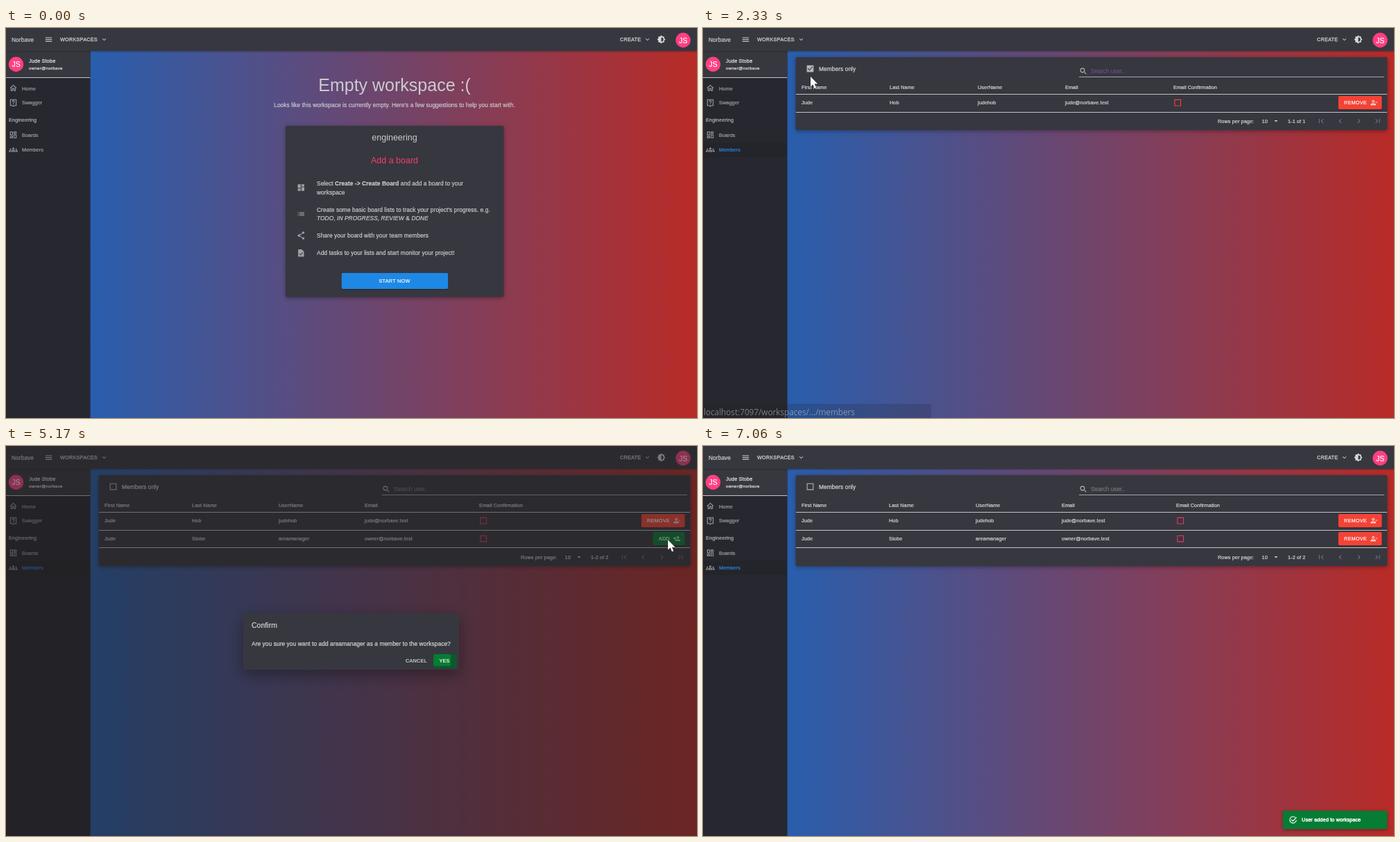
Recreate the animation shown at these times as an HTML page with a canvas. Size 996 by 562 pixels, loop 8.22 s.

```html
<!DOCTYPE html>
<html lang="en">
<head>
<meta charset="utf-8">
<title>Workspace members</title>
<style>
html, body { margin: 0; width: 100%; height: 100%; overflow: hidden; background: #27272f; }
canvas { display: block; }
</style>
</head>
<body>
<canvas id="stage" width="996" height="562"></canvas>
<script>
const W = 996, H = 562, LOOP = 8220;
const ctx = document.getElementById('stage').getContext('2d');
const SANS = '"Liberation Sans", Arial, sans-serif';
const BODY = 8.34, SMALL = 7.3;
const C = {
  surface: '#37373f', drawer: '#27272f', text: '#cbcbcf', table: '#d8d8dc', dim: '#a0a0a6',
  line: '#c3c3c8', pink: '#ff4081', red: '#f44336', green: '#067c34', blue: '#2196f3'
};

// Moments of the story, in ms
const T = {
  page: 1310, row: 1820, uncheck: 3040, dialog: 4870, close: 6150, added: 6500
};

// Icons on a 24 unit grid
const person = 'a4 4 0 100 8 4 4 0 000-8zm0 2a2 2 0 110 4 2 2 0 010-4z';
const ICON = {
  menu: 'M3 6h18v2H3zM3 11h18v2H3zM3 16h18v2H3z',
  more: 'M16.6 8.6L12 13.2 7.4 8.6 6 10l6 6 6-6z',
  theme: 'M20 15.3L23.3 12 20 8.7V4h-4.7L12 .7 8.7 4H4v4.7L.7 12 4 15.3V20h4.7l3.3 3.3 3.3-3.3H20zM12 18V6a6 6 0 010 12z',
  home: 'M12 3L2 12h3v8h6v-6h2v6h6v-8h3zM12 5.7l5 4.5V18h-2v-6H9v6H7v-7.8z',
  help: 'M3 2h18v18h-6l-3 3-3-3H3zM5 4v14h4.8l2.2 2.2 2.2-2.2H19V4zM11 15h2v2h-2zM12 5a4 4 0 00-4 4h2a2 2 0 114 0c0 2-3 1.8-3 5h2c0-2.3 3-2.5 3-5a4 4 0 00-4-4z',
  boards: 'M3 3h8v10H3zM5 5v6h4V5zM13 3h8v6h-8zM15 5v2h4V5zM3 15h8v6H3zM5 17v2h4v-2zM13 11h8v10h-8zM15 13v6h4v-6z',
  board: 'M3 3h8v10H3zM13 3h8v6h-8zM3 15h8v6H3zM13 11h8v10h-8z',
  groups: 'M12 6a3 3 0 100 6 3 3 0 000-6zm0 2a1 1 0 110 2 1 1 0 010-2zM4 9a2 2 0 100 4 2 2 0 000-4zM20 9a2 2 0 100 4 2 2 0 000-4zM6 18v-2c0-4 12-4 12 0v2zM8 16h8c-1-1.6-7-1.6-8 0zM0 18v-2c0-1.6 3-2.4 5-2q-.8 1-.6 4zM24 18v-2c0-1.6-3-2.4-5-2q.8 1 .6 4z',
  list: 'M3 7h2v2H3zM3 11h2v2H3zM3 15h2v2H3zM7 7h14v2H7zM7 11h14v2H7zM7 15h14v2H7z',
  task: 'M4 2h10l6 6v14H4zM10.9 18l6.4-6.4-1.4-1.4-5 5-2.4-2.5-1.5 1.5z',
  box: 'M3 3h18v18H3zM5 5v14h14V5z',
  checked: 'M3 3h18v18H3zM10 17l9-9-1.4-1.4-7.6 7.6-3.6-3.6L5 12z',
  search: 'M9.5 3a6.5 6.5 0 100 13 6.5 6.5 0 000-13zm0 2a4.5 4.5 0 110 9 4.5 4.5 0 010-9zM14 15.5l1.5-1.5 5 5-1.5 1.5z',
  drop: 'M7 10l5 5 5-5z',
  first: 'M18.4 16.6L13.8 12l4.6-4.6L17 6l-6 6 6 6zM6 6h2v12H6z',
  prev: 'M15.4 7.4L14 6l-6 6 6 6 1.4-1.4L10.8 12z',
  remove: 'M10 4' + person + 'M2 20v-2c0-5.3 16-5.3 16 0v2zM4 18h12c-1-2.6-11-2.6-12 0zM17 10h6v2h-6z',
  add: 'M15 4' + person + 'M7 20v-2c0-5.3 16-5.3 16 0v2zM9 18h12c-1-2.6-11-2.6-12 0zM1 10h3V7h2v3h3v2H6v3H4v-3H1z'
};
for (const k in ICON) ICON[k] = new Path2D(ICON[k]);
const ARROW = new Path2D('M0 0V14.5L3.4 11.4 5.8 17 8.2 16 5.8 10.5H10.3z');
const HAND = new Path2D('M-1.2 1.2Q0-1 1.3 1.2V6.2L5.6 7.2Q7.6 7.8 7.4 9.8L6.4 15V18H-2V15.8L-5 11.4Q-5.4 9.4-3.4 10L-1.2 11.8z');

function icon(name, x, y, color, size = 12.5, flip = 1) {
  ctx.save();
  ctx.translate(x, y);
  ctx.scale(flip * size / 24, size / 24);
  ctx.translate(-12, -12);
  ctx.fillStyle = color;
  ctx.fill(ICON[name], 'evenodd');
  ctx.restore();
}

// y is the middle of the capital letters; heavy thickens the strokes a little
function text(s, x, y, size, color, { align = 'left', style = '', gap = 0.01, heavy = 0.2, family = SANS } = {}) {
  ctx.font = `${style} ${size}px ${family}`;
  ctx.letterSpacing = size * gap + 'px';
  ctx.textAlign = align;
  ctx.fillStyle = ctx.strokeStyle = color;
  ctx.fillText(s, x, y + size * 0.36);
  if (heavy) {
    ctx.lineWidth = heavy;
    ctx.lineJoin = 'round';
    ctx.strokeText(s, x, y + size * 0.36);
  }
  return x + ctx.measureText(s).width;
}

function runs(x, y, ...parts) {
  for (const [s, style] of parts) x = text(s, x, y, BODY, C.text, { style });
}

function rect(x, y, w, h, color, r = 0) {
  ctx.fillStyle = color;
  ctx.beginPath();
  ctx.roundRect(x, y, w, h, r);
  ctx.fill();
}

function raised(x, y, w, h, color, r, blur, drop) {
  ctx.save();
  ctx.shadowColor = 'rgba(0,0,0,.35)';
  ctx.shadowBlur = blur;
  ctx.shadowOffsetY = drop;
  rect(x, y, w, h, color, r);
  ctx.restore();
}

function button(x, y, w, h, label, color, pic) {
  raised(x, y, w, h, color, 2, 2, 0.8);
  text(label, x + 8.3, y + h / 2, SMALL, '#fff', { gap: 0.0286 });
  icon(pic, x + w - 11.5, y + h / 2, '#fff', 10.8);
}

function avatar(x, y) {
  ctx.fillStyle = C.pink;
  ctx.beginPath();
  ctx.arc(x, y, 10.7, 0, 7);
  ctx.fill();
  text('JS', x, y + 0.3, 10.4, '#fff', { align: 'center', gap: 0 });
}

const ramp = (t, a, b) => Math.min(1, Math.max(0, (t - a) / (b - a)));

function faded(alpha, draw) {
  if (alpha <= 0) return;
  ctx.save();
  ctx.globalAlpha = alpha;
  draw();
  ctx.restore();
}

const sky = ctx.createLinearGradient(0, 0, W, 0);
sky.addColorStop(0, '#1565c0');
sky.addColorStop(1, '#b92b27');

function shell(t) {
  raised(0, 33, 121.4, 529, C.drawer, 0, 2, 0);
  rect(0, 33, 121.4, 38, C.surface);
  rect(0, 71, 121.4, 1, C.line);
  raised(0, 0, W, 33.3, C.surface, 0, 3, 1);

  text('Norbave', 8, 17, BODY, C.text);
  icon('menu', 61.5, 16.5, C.text);
  text('WORKSPACES', 78, 16.5, SMALL, C.text, { gap: 0.0286, heavy: 0.3 });
  icon('more', 141.5, 16.5, C.text, 11);
  text('CREATE', 885, 16.5, SMALL, C.text, { gap: 0.0286, heavy: 0.3 });
  icon('more', 924.5, 16.5, C.text, 11);
  icon('theme', 944.5, 16.5, '#d8d8dc');
  avatar(976, 17.5);

  avatar(14.5, 52.2);
  text('Jude Stobe', 33, 47, SMALL, C.text, { gap: 0.02, heavy: 0.35 });
  text('owner@norbave', 33, 58, 6.25, C.text, { gap: 0.0333, heavy: 0.3 });

  const here = t >= T.page;
  if (here) rect(0, 165, 121, 21, 'rgba(0,0,0,.08)');
  icon('home', 10.5, 86.5, C.dim);
  text('Home', 23, 87, SMALL, C.dim);
  icon('help', 10.5, 108, C.dim);
  text('Swagger', 23, 107.7, SMALL, C.dim);
  text('Engineering', 4, 132, SMALL, '#b4b4b9', { gap: 0.015 });
  icon('boards', 10.5, 154, C.dim);
  text('Boards', 23, 154, SMALL, C.dim);
  icon('groups', 10.5, 175.3, C.dim);
  text('Members', 23, 175.5, SMALL, here ? '#2d86e2' : C.dim);
}

function emptyPage() {
  const mid = { align: 'center' };
  const title = { align: 'center', gap: 0, heavy: 0 };
  text('Empty workspace :(', 560, 82, 25, C.text, title);
  text("Looks like this workspace is currently empty. Here's a few suggestions to help you start with.",
    560, 111, BODY, C.text, mid);
  raised(403, 141, 314.5, 246.5, C.surface, 2, 6, 1.5);
  text('engineering', 560, 157, 12.5, C.text, title);
  text('Add a board', 560, 190.5, 12.5, '#fb3c68', title);

  icon('board', 425.3, 230, C.dim);
  runs(448, 224, ['Select '], ['Create -> Create Board', 'bold'], [' and add a board to your']);
  text('workspace', 448, 236.5, BODY, C.text);
  icon('list', 425.3, 268, C.dim);
  text("Create some basic board lists to track your project's progress. e.g.", 448, 262, BODY, C.text);
  runs(448, 274, ['TODO', 'italic'], [', '], ['IN PROGRESS', 'italic'], [', '],
    ['REVIEW', 'italic'], [' & '], ['DONE', 'italic']);

  ctx.strokeStyle = ctx.fillStyle = C.dim;
  ctx.lineWidth = 1.1;
  ctx.beginPath();
  ctx.moveTo(428.5, 294.9);
  ctx.lineTo(422.2, 299);
  ctx.lineTo(428.5, 303.1);
  ctx.stroke();
  for (const [x, y] of [[428.5, 294.9], [422.2, 299], [428.5, 303.1]]) {
    ctx.beginPath();
    ctx.arc(x, y, 1.7, 0, 7);
    ctx.fill();
  }
  text('Share your board with your team members', 448, 299.3, BODY, C.text);
  icon('task', 425.3, 324.3, C.dim);
  text('Add tasks to your lists and start monitor your project!', 448, 324.3, BODY, C.text);

  raised(483.7, 353, 153.5, 23, '#1e88e5', 2, 2, 0.8);
  text('START NOW', 560, 364.5, SMALL, '#fff', { align: 'center', gap: 0.0286 });
}

const COLUMNS = [
  [142, 302, 460, 618, 738],
  [142, 269, 396, 522, 678],
  [142, 268, 393, 517, 682]
];
const HEADS = ['First Name', 'Last Name', 'UserName', 'Email', 'Email Confirmation'];
const USERS = [
  ['Jude', 'Hob', 'judehob', 'jude@norbave.test'],
  ['Jude', 'Stobe', 'areamanager', 'owner@norbave.test']
];

function membersPage(t) {
  const n = t < T.row ? 0 : t < T.uncheck + 100 ? 1 : 2;
  const foot = [111, 134, 160][n];
  const cols = COLUMNS[n];
  const late = t >= T.dialog;
  raised(133.7, 42, 852.6, foot - 29, C.surface, 2, 6, 1.5);

  icon(t < T.uncheck ? 'checked' : 'box', 154.5, 58.5, '#b5b5ba', 13);
  text('Members only', 167, 58.5, BODY, C.table);
  icon('search', 548.3, 62.3, '#b5b5ba');
  text('Search user..', 559, 62, BODY, late ? '#75757d' : '#654f88', { gap: 0 });
  rect(542, 70, 440, 1, '#a4a4aa');

  HEADS.forEach((s, i) => text(s, cols[i], 85.3, SMALL, C.table));
  rect(134, 95, 852, 1, C.line);
  if (!n) {
    rect(134, 96, 852, 1, 'rgba(33,150,243,.25)');
    rect(134, 97, 852, 1, C.line);
    rect(134, 95.5, 350 * ramp(t, T.page, 1670) ** 3.7, 2, C.blue);
  }

  for (let r = 0; r < n; r++) {
    const y = 107.7 + r * 25.8;
    USERS[r].forEach((s, i) => text(s, cols[i], y, SMALL, C.table));
    icon('box', cols[4] + 6.2, y, late ? '#ea3668' : C.red, 13);
    if (r && t < T.added) button(932.5, 124, 46, 19, 'ADD', C.green, 'add');
    else button(915.7, 98 + r * 26, 62.8, 19.2, 'REMOVE', C.red, 'remove');
    rect(134, Math.floor(121 + r * 25.5), 852, 1, C.line);
  }

  text('Rows per page:', 742, foot, SMALL, C.table);
  text('10', 805.5, foot + 0.5, SMALL, C.table);
  icon('drop', 826, foot, C.text, 12);
  text(n ? `1-${n} of ${n}` : '0-0 of 0', 843, foot, SMALL, C.table);
  icon('first', 891, foot, '#75757c');
  icon('prev', 918.5, foot, '#75757c');
  icon('prev', 945.5, foot, '#75757c', 12.5, -1);
  icon('first', 972.5, foot, '#75757c', 12.5, -1);
}

function statusBar(t) {
  const shown = ramp(t, 960, 1110) * (1 - ramp(t, 2270, 2380));
  faded(shown ** 2, () => rect(0, 541.5, 329, 21, '#222225', [0, 3, 0, 0]));
  faded(shown, () => text('localhost:7097/workspaces/.../members', 1, 553.5, 11.72, '#eeeeee',
    { gap: 0, heavy: 0, family: '"Open Sans", "Noto Sans", sans-serif' }));
}

function dialog(t) {
  faded(ramp(t, T.dialog, T.dialog + 250) * (1 - ramp(t, T.close, T.close + 300)), () => {
    rect(0, 0, W, H, 'rgba(33,33,33,.5)');
    raised(342, 241, 311, 81.5, C.surface, 2, 22, 7);
    text('Confirm', 354, 258, 10.4, C.table);
    text('Are you sure you want to add areamanager as a member to the workspace?', 354, 285, BODY, C.table);
    text('CANCEL', 576, 309, SMALL, C.table, { gap: 0.0286 });
    rect(616, 300, 33, 20, '#0b5a2b', 2);
    rect(616, 300, 25, 17, C.green, 2);
    text('YES', 632, 309, SMALL, '#fff', { align: 'center', gap: 0.0286 });
  });
}

function toast(t) {
  faded(ramp(t, T.added - 50, T.added + 250), () => {
    raised(835.7, 525.5, 150.6, 26.5, C.green, 2, 5, 1.5);
    ctx.strokeStyle = '#fff';
    ctx.lineWidth = 1.1;
    ctx.beginPath();
    ctx.arc(850.5, 538.7, 4.7, 0.05, 5.5);
    ctx.moveTo(848, 538.2);
    ctx.lineTo(850.3, 540.5);
    ctx.lineTo(855.5, 535.2);
    ctx.stroke();
    text('User added to workspace', 863, 538.7, SMALL, '#fff', { gap: 0.015, heavy: 0.45 });
  });
}

// Pointer path: time, x, y
const PATH = [
  [50, 774, 513], [550, 30, 84], [850, 43, 180], [1820, 43, 180], [2280, 155, 70], [2330, 155, 70],
  [2590, 155, 64], [3240, 155, 64], [3500, 630, 256], [3600, 662, 237], [3900, 662, 237],
  [4100, 672, 259], [4510, 857, 161], [4720, 955, 135], [5150, 955, 135], [5530, 804, 183],
  [5900, 637, 306], [6500, 637, 306], [7050, 830, 580]
];
const HOVER = [[800, 1880], [2690, 3290], [4690, 4950], [5860, 6350]];

const slope = (i, k) => (PATH[i + 1][k] - PATH[i][k]) / (PATH[i + 1][0] - PATH[i][0]);

// Monotone tangent: zero at rests and turning points
function tangent(i, k) {
  if (i === 0 || i === PATH.length - 1) return 0;
  const a = slope(i - 1, k), b = slope(i, k);
  return a * b > 0 ? 2 * a * b / (a + b) : 0;
}

function along(t, k) {
  let i = 0;
  while (i < PATH.length - 2 && t >= PATH[i + 1][0]) i++;
  const d = PATH[i + 1][0] - PATH[i][0], u = (t - PATH[i][0]) / d, v = 1 - u;
  return PATH[i][k] * v * v * (1 + 2 * u) + PATH[i + 1][k] * u * u * (1 + 2 * v)
    + d * u * v * (tangent(i, k) * v - tangent(i + 1, k) * u);
}

function pointer(t) {
  if (t < PATH[0][0] || t >= PATH[PATH.length - 1][0]) return;
  const shape = HOVER.some(([a, b]) => t >= a && t < b) ? HAND : ARROW;
  ctx.save();
  ctx.translate(along(t, 1), along(t, 2));
  ctx.lineWidth = 1;
  ctx.strokeStyle = 'rgba(20,20,24,.75)';
  ctx.fillStyle = '#fff';
  ctx.stroke(shape);
  ctx.fill(shape);
  ctx.restore();
}

function draw(t) {
  rect(0, 0, W, H, sky);
  shell(t);
  if (t < T.page) emptyPage(); else membersPage(t);
  statusBar(t);
  dialog(t);
  toast(t);
  pointer(t);
}

const start = performance.now();
function tick() {
  draw((performance.now() - start) % LOOP);
  requestAnimationFrame(tick);
}
tick();
</script>
</body>
</html>
```
